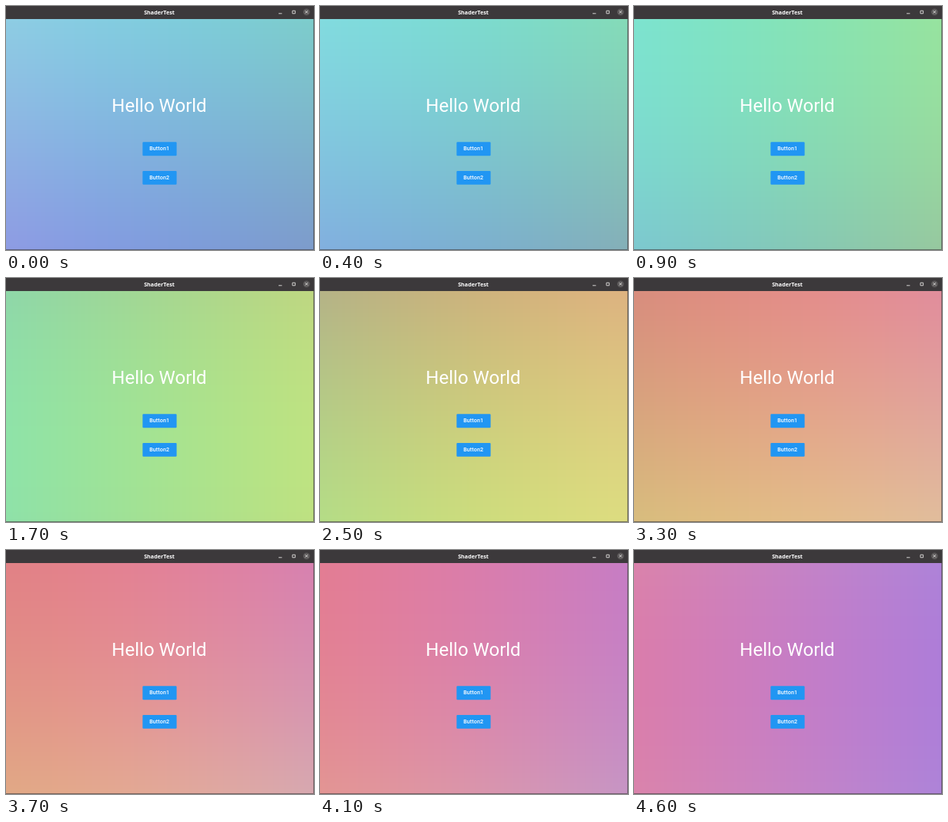
Animation of 400 by 318 pixels, one loop 4700 ms. Source, as an HTML page with a canvas:

```html
<!DOCTYPE html>
<html lang="en">
<head>
<meta charset="utf-8">
<title>ShaderTest</title>
<style>
  html, body { margin: 0; width: 400px; height: 318px; overflow: hidden; background: #3c393b; }
  canvas, svg { position: absolute; left: 0; display: block; }
  canvas { top: 17px; }
  svg { top: 0; }
  text { fill: #fff; text-anchor: middle; font-family: Roboto, sans-serif; }
  .title { font: 700 7.2px "Open Sans", "Noto Sans", sans-serif; }
  .hello { font-size: 24px; }
  .label { font-size: 7.2px; font-weight: 500; letter-spacing: .1px; }
  .button { fill: #2196f3; }
  .icon { fill: none; stroke: #e4e2e0; stroke-width: .9; }
</style>
</head>
<body>
<canvas id="shader" width="400" height="301"></canvas>
<svg width="400" height="318" viewBox="0 0 400 318">
  <rect width="400" height="17" fill="#3c393b"/>
  <text class="title" x="199" y="11">ShaderTest</text>
  <path class="icon" d="M354 9.8h4.4M372 6.2h3.6v3.6h-3.6z"/>
  <circle cx="390.3" cy="7.8" r="4.4" fill="#5d5a5b"/>
  <path class="icon" d="M388.6 6.1l3.4 3.4m0-3.4l-3.4 3.4"/>

  <text class="hello" x="199" y="138.4">Hello World</text>

  <rect class="button" x="177.4" y="177.3" width="44.2" height="17.9" rx="1.2"/>
  <text class="label" x="199.2" y="188.3">Button1</text>
  <rect class="button" x="177.4" y="214.9" width="44.2" height="17.9" rx="1.2"/>
  <text class="label" x="199.2" y="226">Button2</text>

  <path d="M399.5 17V317.5H0" fill="none" stroke="#3c393b" stroke-opacity=".6"/>
</svg>
<script>
const LOOP = 4700, STEP = 100, START_PHASE = 2.3;
const canvas = document.getElementById('shader');
const context = canvas.getContext('2d');
const { width, height } = canvas;
const image = context.createImageData(width, height);

const level = angle => 255 * (0.69 + 0.2 * Math.cos(angle));

// Red and blue vary across the window, green varies up it.
function render(ms) {
  const phase = START_PHASE + ms / 1000;
  const columns = Array.from({ length: width }, (_, x) => {
    const u = (x + 0.5) / width;
    return [level(phase + u), level(phase + u + 4)];
  });
  for (let y = 0, i = 0; y < height; y++) {
    const green = level(phase + 1 - (y + 0.5) / height + 2);
    for (const [red, blue] of columns) {
      image.data[i++] = red;
      image.data[i++] = green;
      image.data[i++] = blue;
      image.data[i++] = 255;
    }
  }
  context.putImageData(image, 0, 0);
}

const origin = performance.now();
let shown = 0;

function tick() {
  const elapsed = Math.max(0, performance.now() - origin) % LOOP;
  const time = Math.floor(elapsed / STEP) * STEP;
  if (time !== shown) render(shown = time);
  requestAnimationFrame(tick);
}

render(0);
requestAnimationFrame(tick);
</script>
</body>
</html>
```
